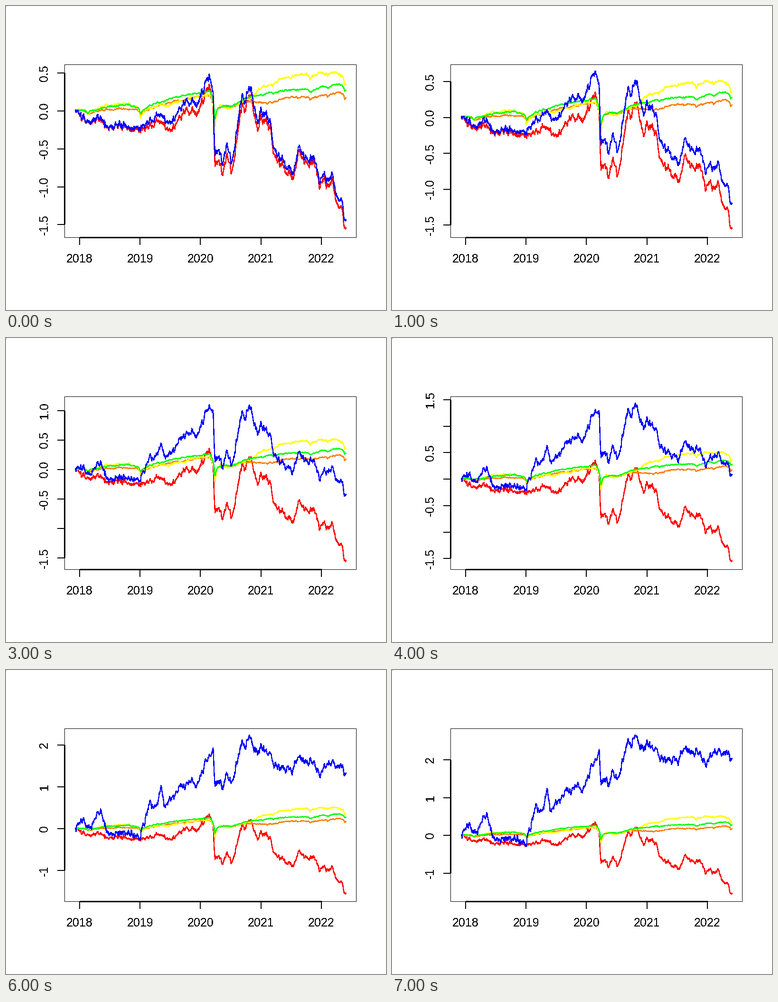
Recreate the animation shown at these times as a matplotlib script. Size 800 by 640 pixels, loop 8000 ms.

```python
import numpy as np
import matplotlib.pyplot as plt
from matplotlib.animation import FuncAnimation
from matplotlib.patches import Rectangle

plt.rcParams.update({
    "font.family": "Liberation Sans",
    "font.size": 18,
    "text.antialiased": False,
    "path.simplify": False,
})

W, H, DPI = 800, 640, 100
PX = 72 / DPI                      # one pixel in points
LEFT, TOP, RIGHT, BOTTOM = 123, 123, 737, 487
STEPS = 8
DAYS = 1126
X = np.linspace(146, 715.5, DAYS)  # pixel column of each trading day
LOW = -1.586                       # lowest value in every step
HIGHS = [0.527, 0.648, 0.88, 1.125, 1.437, 1.835, 2.24, 2.66]

# Market shocks: column, depth, recovery length in pixels
SHOCKS = [(172, .05, 15), (283, .08, 10), (440, .25, 5), (562, .03, 6),
          (640, .05, 10), (677, .03, 6), (713, .1, 20)]


def trend(*points):
    xs, ys = zip(*points)
    return np.interp(X, xs, ys)


def noise(size, seed, memory=0.85):
    """Daily jitter that keeps returning to zero."""
    kicks = np.random.default_rng(seed).normal(0, 1, DAYS)
    out = np.zeros(DAYS)
    for i in range(1, DAYS):
        out[i] = memory * out[i - 1] + kicks[i]
    return out * size * np.sqrt(1 - memory ** 2)


def shocks(strength):
    """Sharp falls, each followed by an exponential recovery."""
    total = np.zeros(DAYS)
    for x0, depth, recovery in SHOCKS:
        d = X - x0
        total -= depth * np.exp(-np.abs(d) / np.where(d < 0, 3, recovery))
    return strength * total


def bell(center, width):
    return np.exp(-((X - center) / width) ** 2)


orange = shocks(1) + noise(0.007, 3) + trend(
    (146, 0), (265, .03), (283, .01), (360, .13), (430, .21), (450, .07),
    (474, .05), (505, .13), (550, .11), (590, .18), (630, .18), (706, .25))
yellow = shocks(1.6) + noise(0.011, 4) + trend(
    (146, .01), (250, .1), (283, .03), (340, .09), (430, .23), (465, .03),
    (520, .18), (530, .28), (588, .45), (668, .52), (716, .49))
green = shocks(1.1) + noise(0.007, 5) + trend(
    (146, .01), (253, .08), (283, .05), (352, .17), (430, .27), (450, .08),
    (474, .05), (500, .16), (585, .28), (628, .28), (706, .36))
red = noise(0.037, 1) + trend(
    (146, 0), (174, -.15), (195, -.09), (210, -.19), (300, -.22), (320, -.1),
    (342, -.28), (374, -.05), (403, -.02), (428, .33), (436, .05),
    (440, -.72), (447, -.53), (455, -.85), (466, -.62), (475, -.78),
    (497, .1), (516, .18), (530, -.25), (537, -.03), (557, -.2), (563, -.55),
    (586, -.82), (604, -.88), (618, -.5), (628, -.68), (651, -.7),
    (660, -.93), (687, -.93), (696, -1.22), (707, -1.28), (712, -1.57))

# Distance of blue above red at the last step, and its bend on the way there
gap = noise(0.06, 2) + trend(
    (146, 0), (161, .4), (175, .15), (197, .7), (215, .12), (282, .12),
    (303, .95), (318, .8), (327, 1.3), (333, .9), (357, 1.25), (403, 1.3),
    (428, 1.7), (436, 2.1), (475, 2.3), (515, 2.45), (557, 2.55),
    (604, 2.87), (655, 2.85), (687, 3.25), (716, 3.64))
bend = 0.2 * bell(400, 110) - 0.12 * bell(640, 90)


def blue(k):
    u = (k + 1) / STEPS
    return red + u ** 1.6 * gap + np.sin(np.pi * u) * bend


fig = plt.figure(figsize=(W / DPI, H / DPI), dpi=DPI, facecolor="white")
ax = fig.add_axes([0, 0, 1, 1])
ax.set(xlim=(0, W), ylim=(H, 0))
ax.axis("off")


def bar(x, y, w, h):
    patch = Rectangle((x, y), w, h, fc="black", lw=0, aa=False)
    return ax.add_patch(patch)


def plot_line(color):
    line, = ax.plot([], [], color=color, lw=1.4 * PX, aa=False, snap=False,
                    solid_joinstyle="round", zorder=3)
    return line


def label_width(text):
    return sum({".": 7, "-": 8}.get(c, 14) for c in text)


lines = [plot_line(c) for c in
         ("#ff0000", "#ff7f00", "#ffff00", "#00ff00", "#0000ff")]

# Frame, date axis and corner dot
for y in (TOP, BOTTOM):
    bar(LEFT, y, RIGHT - LEFT + 1, 1)
for x in (LEFT, RIGHT):
    bar(x, TOP, 1, BOTTOM - TOP + 1)
bar(155, BOTTOM - 1, 510, 3)
bar(0, 0, 1, 1)
for year in range(2018, 2023):
    days = 365 * (year - 2018) + (year > 2020)
    x = 155.1 + 0.3483 * days
    bar(round(x) - 1, BOTTOM, 2, 16)
    ax.text(x, 540.5, str(year), ha="center", va="baseline")

value_axis = []


def draw_value_axis(to_y, high):
    while value_axis:
        value_axis.pop().remove()
    pad = (high - LOW) * 0.04
    step = 0.5 if high - LOW < 3.6 else 1
    first = np.ceil((LOW - pad) / step)
    last = np.floor((high + pad) / step)
    ticks = np.arange(first, last + 1) * step
    ys = to_y(ticks)
    value_axis.append(bar(LEFT - 1, ys[-1], 3, ys[0] - ys[-1]))
    edge = H
    for v, y in zip(ticks, ys):
        value_axis.append(bar(LEFT - 15, round(y) - 1, 15, 2))
        text = f"{v:.1f}" if step < 1 else f"{v:.0f}"
        half = label_width(text) / 2
        # Skip a label that would crowd the one below
        if y + half + 21 > edge:
            continue
        edge = y - half
        value_axis.append(ax.text(88, y, text, rotation=90, ha="center",
                                  va="baseline", rotation_mode="anchor"))


def update(k):
    high = HIGHS[k]
    scale = (BOTTOM - TOP) / 1.08 / (high - LOW)
    base = TOP + 0.5 + (BOTTOM - TOP) * 0.04 / 1.08

    def to_y(v):
        return base + (high - v) * scale

    for line, values in zip(lines, (red, orange, yellow, green, blue(k))):
        line.set_data(X, to_y(np.clip(values, LOW, high)))
    draw_value_axis(to_y, high)
    return [*lines, *value_axis]


anim = FuncAnimation(fig, update, frames=STEPS, interval=1000,
                     repeat=True, blit=False)
plt.show()
```
